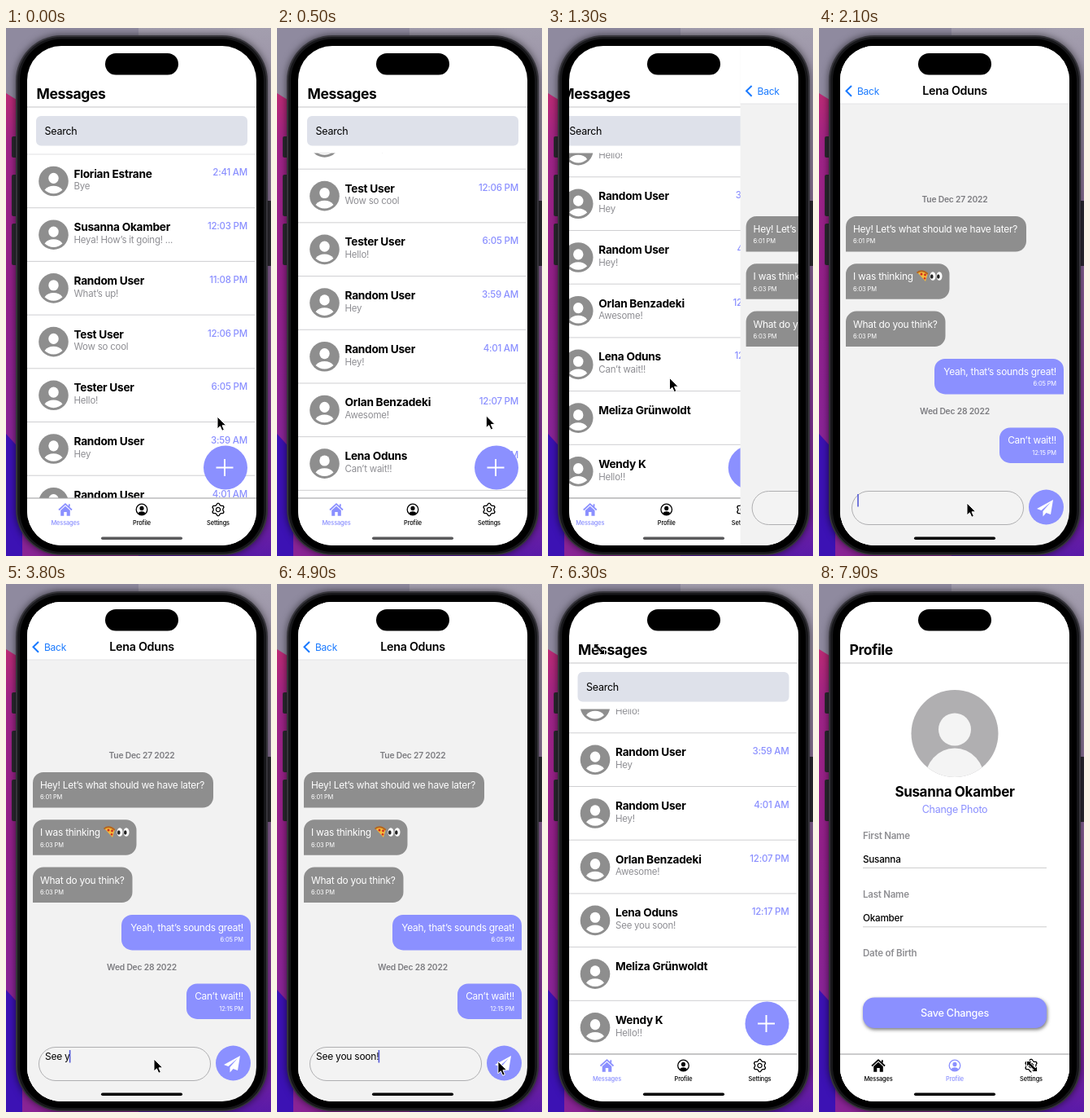
Write an HTML page that moves like this. It is 326 by 648 pixels and loops after 8000 ms.

```html
<!DOCTYPE html>
<html lang="en">
<head>
<meta charset="utf-8">
<title>Chat app demo</title>
<style>
  html, body { margin: 0; width: 100%; height: 100%; overflow: hidden; background: #000; }
  svg { display: block; width: 326px; height: 648px; }
  text { font-family: Inter, Roboto, sans-serif; letter-spacing: -.02em; white-space: pre; }
</style>
</head>
<body>
<svg id="stage" viewBox="0 0 326 648"></svg>
<script>
const LOOP = 8000, ACCENT = '#8b90ff', GRAY = '#8e8e8e', ROW = 65.7, SHIFT = 58.3;
const FRIEND = 'Lena Oduns', FIRST = 'Susanna', LAST = 'Okamber', DRAFT = 'See you soon!';
const TAP_CHAT = 1250, FOCUS = 2000, SEND = 5050, TAP_BACK = 5850, TAP_PROFILE = 7050, SLIDE = 550;

const text = (x, y, size, weight, fill, str, anchor = 'start', id = '') =>
  `<text id="${id}" x="${x}" y="${y}" font-size="${size}" font-weight="${weight}" fill="${fill}" text-anchor="${anchor}">${str}</text>`;
const rect = (x, y, w, h, fill, r = 0, more = '') =>
  `<rect x="${x}" y="${y}" width="${w}" height="${h}" rx="${r}" fill="${fill}" ${more}/>`;
const circle = (x, y, r, fill, more = '') => `<circle cx="${x}" cy="${y}" r="${r}" fill="${fill}" ${more}/>`;
const path = (d, fill, more = '') => `<path d="${d}" fill="${fill}" ${more}/>`;
const line = (x, y, w, color) => rect(x, y - .5, w, 1, color);

// Head and shoulders that fit a disc of radius 10
const person = c => `<ellipse cy="-2" rx="3.4" ry="3.6" fill="${c}"/>` +
  path('M0 8.4C-2.4 8.4-4.5 7.4-6 5.9-4.600 4-2.500 3.100 0 3.100S4.600 4 6 5.900C4.500 7.400 2.400 8.400 0 8.400Z', c);

// Contact list
const contacts = [
  ['Florian Estrane', 'Bye', '2:41 AM'], [`${FIRST} ${LAST}`, 'Heya! How’s it going! ...', '12:03 PM'],
  ['Random User', 'What’s up!', '11:08 PM'], ['Test User', 'Wow so cool', '12:06 PM'],
  ['Tester User', 'Hello!', '6:05 PM'], ['Random User', 'Hey', '3:59 AM'],
  ['Random User', 'Hey!', '4:01 AM'], ['Orlan Benzadeki', 'Awesome!', '12:07 PM'],
  [FRIEND, 'Can’t wait!!', '12:15 PM'], ['Meliza Grünwoldt', '', ''], ['Wendy K', 'Hello!!', '']
];
const avatar = (x, y) =>
  `<g transform="translate(${x} ${y}) scale(1.83)">${circle(0, 0, 10, GRAY)}${person('#fff')}</g>`;
const row = ([name, last, time], i) => {
  const y = 155 + i * ROW, id = name === FRIEND ? 'friend' : 'row' + i;
  return avatar(58.5, y + 33) + text(83.5, y + 28.5, 13.7, 700, '#000', name) +
    text(83.5, y + 43.3, 11.5, 400, '#8e8e93', last, 'start', id + 'Last') +
    text(297, y + 26.4, 11.5, 500, ACCENT, time, 'end', id + 'Time') + line(26, y + ROW, 280, '#cfcfd2');
};

// Tab bar
const gear = Array.from({ length: 24 }, (_, i) => {
  const a = (i + 1.5) * Math.PI / 12, r = i % 4 < 2 ? 7.6 : 5.9;
  return `${(r * Math.cos(a)).toFixed(2)} ${(r * Math.sin(a)).toFixed(2)}`;
}).join('L');
const outline = c => `stroke="${c}" stroke-width="1.3" stroke-linejoin="round"`;
const icons = [
  c => path('M-8 .5L0-6.800 8 .5M4.800-3.500V-6.800', 'none', `stroke="${c}" stroke-width="1.8"`) +
    path('M-5.800 1L0-4.300 5.800 1V7.800H1.700V3H-1.700V7.800H-5.800Z', c),
  c => circle(0, 0, 6.8, 'none', outline(c)) + `<g transform="scale(.76)">${person(c)}</g>`,
  c => path(`M${gear}Z`, 'none', outline(c)) + circle(0, 0, 2.6, 'none', outline(c))
];
const tabs = active => rect(26, 577, 282, 58, '#fff') + line(26, 577, 282, '#9a9a9c') +
  ['Messages', 'Profile', 'Settings'].map((label, i) => {
    const x = 73 + 94 * i, c = i === active ? ACCENT : '#000';
    return `<g transform="translate(${x} 591)">${icons[i](c)}</g>` + text(x, 610.3, 7.4, 450, c, label, 'middle');
  }).join('');
const heading = label => text(37.5, 87.3, 17.5, 700, '#000', label) + line(26, 97, 282, '#c4c4c6');

const listScreen = rect(26, 22, 282, 613, '#fff') +
  `<g clip-path="url(#listClip)"><g id="rows">${line(26, 155, 282, '#e2e2e4')}${contacts.map(row).join('')}</g></g>` +
  heading('Messages') + rect(37, 108, 260, 36.5, '#dee1ea', 6) + text(47.5, 130.8, 12.5, 400, '#000', 'Search') +
  circle(270, 539.5, 27, ACCENT) + path('M258.500 539.500h21M269 529v21', 'none', 'stroke="#fff" stroke-width="2"') + tabs(0);

// Conversation
const bubble = (y, w, str, time, mine) => {
  const x = mine ? 301 - w : 33, r = 13, h = 43.5, edge = mine ? 292 : 42, anchor = mine ? 'end' : 'start';
  const right = mine ? `v${h - r}h${r - w}` : `v${h - 2 * r}a${r} ${r} 0 0 1 ${-r} ${r}h${r - w}`;
  const left = mine ? `a${r} ${r} 0 0 1 ${-r} ${-r}v${2 * r - h}` : `v${r - h}`;
  return path(`M${x + r} ${y}h${w - 2 * r}a${r} ${r} 0 0 1 ${r} ${r}${right}${left}a${r} ${r} 0 0 1 ${r} ${-r}Z`, mine ? ACCENT : GRAY) +
    text(edge, y + 20, 11.9, 400, '#fff', str, anchor) + text(edge, y + 33.2, 7.5, 400, '#fff', time, anchor);
};
const day = (y, str) => text(167, y, 10.3, 600, '#7c7c80', str, 'middle');
const pizza = path('M121 300Q128 296 133.5 302L131 311Z', '#f5b93c') +
  path('M120.5 300.5Q127 295.5 133.8 302', 'none', 'stroke="#b5651d" stroke-width="2"') +
  circle(126, 302, 1.5, '#cf2f1f') + circle(130.5, 303, 1.4, '#cf2f1f') + circle(130, 307.3, 1.2, '#cf2f1f');
const eyes = [140, 148].map(x => `<ellipse cx="${x}" cy="304.5" rx="3.5" ry="5.3" fill="#fff"/>` +
  `<ellipse cx="${x - 1.2}" cy="305" rx="1.8" ry="2.8" fill="#222"/>`).join('');

const chatScreen = rect(26, 22, 282, 613, '#f2f2f2') + '<g id="thread">' +
  day(213.6, 'Tue Dec 27 2022') +
  bubble(231, 222, 'Hey! Let’s what should we have later?', '6:01 PM') +
  bubble(231 + SHIFT, 127.5, 'I was thinking', '6:03 PM') + pizza + eyes +
  bubble(231 + 2 * SHIFT, 122.5, 'What do you think?', '6:03 PM') +
  bubble(231 + 3 * SHIFT, 159, 'Yeah, that’s sounds great!', '6:05 PM', true) +
  day(473.6, 'Wed Dec 28 2022') + bubble(490.4, 79, 'Can’t wait!!', '12:15 PM', true) +
  `<g id="sent">${bubble(490.4 + SHIFT, 94, DRAFT, '12:17 PM', true)}</g></g>` +
  rect(26, 22, 282, 71, '#fff') + line(26, 93, 282, '#e6e6e8') +
  path('M40 71l-6.5 6.3 6.5 6.4', 'none', 'stroke="#1a7aff" stroke-width="2"') +
  text(47, 81.6, 12, 400, '#1a7aff', 'Back') + text(167, 81.6, 14.3, 600, '#000', FRIEND, 'middle') +
  rect(40.5, 568.5, 211, 41, '#f3f3f3', 20.5, 'stroke="#a8a8aa" stroke-width=".9"') +
  text(48, 584.3, 12, 400, '#000', '', 'start', 'draft') + rect(47.2, 572, 1.6, 15.5, '#555bd6', 0, 'id="caret"') +
  circle(279.5, 588, 21.5, ACCENT) + path('M288 579L268 590l5.5 2L285 582l-9.5 11v6.5l4-4.5 5.5 2Z', '#fff');

// Profile
const field = (y, label, value) => text(54, y, 11.5, 600, '#8e8e92', label) +
  (value ? text(54, y + 29, 11.7, 500, '#000', value) + line(54, y + 35.8, 226, '#ccc') : '');
const profileScreen = rect(26, 22, 282, 613, '#fff') + heading('Profile') +
  circle(167, 183.5, 53.5, '#b0afb1') + circle(167, 178.5, 20, '#f4f4f4') +
  '<ellipse cx="167" cy="241.5" rx="37" ry="40" fill="#f4f4f4" clip-path="url(#photoClip)"/>' +
  text(167, 260.6, 17, 700, '#000', `${FIRST} ${LAST}`, 'middle') + text(167, 280.6, 12.5, 400, ACCENT, 'Change Photo', 'middle') +
  field(312.6, 'First Name', FIRST) + field(385, 'Last Name', LAST) + field(457.4, 'Date of Birth') +
  rect(54, 507.5, 226, 37.5, ACCENT, 14, 'style="filter:drop-shadow(1.5px 2.5px 2px #0008)"') +
  text(167, 531, 12.7, 500, '#fff', 'Save Changes', 'middle') + tabs(1);

// Wallpaper and phone
const gradient = (id, stops) => `<linearGradient id="${id}" x2="0" y2="1">` +
  stops.map(([at, c]) => `<stop offset="${at}" stop-color="${c}"/>`).join('') + '</linearGradient>';
const wallpaper = rect(0, 0, 163, 648, 'url(#wallLeft)') + rect(163, 0, 163, 648, 'url(#wallRight)') +
  path('M0 0H163V180L0 80Z', '#8f8a9f') + path('M0 498L20 520V648H0Z', '#3c12b4');
const buttons = [[7, 133, 26], [7, 180, 51], [7, 240, 51], [320, 212, 80]]
  .map(([x, y, h]) => rect(x, y, 7, h, '#2b2930', 2)).join('');
const body = rect(12, 9, 310, 638, '#35343a', 56, 'style="filter:drop-shadow(0 0 5px #0009)"') +
  rect(14, 11, 306, 634.5, '#17171a', 54) + rect(17, 13.5, 300, 629.5, '#000', 51);

stage.innerHTML = `<defs>
  <clipPath id="screenClip">${rect(26, 22, 282, 613, '#000', 42)}</clipPath>
  <clipPath id="listClip">${rect(26, 153.5, 282, 424, '#000')}</clipPath>
  <clipPath id="photoClip">${circle(167, 183.5, 53.5, '#000')}</clipPath>
  ${gradient('wallLeft', [[.1, '#c22c70'], [.22, '#a02487'], [.5, '#92208a'], [.76, '#8a2496']])}
  ${gradient('wallRight', [[0, '#a39eae'], [.2, '#94889f'], [.45, '#8a6598'], [.7, '#8a3d9c'], [.88, '#80259e'], [1, '#5a1aa8']])}
  </defs>` + wallpaper + buttons + body +
  `<g clip-path="url(#screenClip)"><g id="list">${listScreen}</g><g id="chat">${chatScreen}</g><g id="profile">${profileScreen}</g></g>` +
  rect(122, 31, 90, 26.5, '#000', 13.2) + rect(117, 624.5, 100, 3.5, '#000', 1.75, 'id="homeBar"') +
  '<g id="pointer"><g id="arrow">' +
  path('M0 0V15L3.4 11.8 5.8 17.3 8.4 16.2 6 10.8H10.8Z', '#000', 'stroke="#fff"') + '</g><g id="resize">' +
  path('M-6.5-6.5H.5L-1.8-4.2 4.2 1.8 6.5-.5V6.5H-.5L1.8 4.2-4.2-1.8-6.5.5Z', '#000', 'stroke="#fff"') + '</g></g>';

const $ = id => document.getElementById(id);
const clamp = v => Math.min(1, Math.max(0, v));
const smooth = v => v * v * (3 - 2 * v);
const move = (id, x, y) => $(id).setAttribute('transform', `translate(${x} ${y})`);
const show = (id, on) => $(id).setAttribute('visibility', on ? 'visible' : 'hidden');
const slide = (t, start) => 1 - (1 - clamp((t - start) / SLIDE)) ** 3;

const track = [[0, 260, 477], [450, 260, 477], [1000, 149, 427], [1250, 149, 427], [1950, 182, 583],
  [4500, 182, 583], [4950, 275, 586], [5150, 275, 586], [5650, 50, 58], [5720, 50, 58], [5850, 50, 76], [6300, 63, 80],
  [6450, 63, 80], [6950, 167, 592], [7150, 167, 592], [7700, 262, 592], [LOOP, 262, 592]];
function pointerAt(t) {
  const i = track.findIndex(k => k[0] > t), [t0, x0, y0] = track[i - 1], [t1, x1, y1] = track[i];
  const p = smooth((t - t0) / (t1 - t0));
  return [x0 + (x1 - x0) * p, y0 + (y1 - y0) * p];
}

function draw(t) {
  const open = slide(t, TAP_CHAT) - slide(t, TAP_BACK), sent = t >= SEND;
  move('rows', 0, -300.7 * smooth(clamp((t - 50) / 800)));
  move('list', -84 * open, 0);
  move('chat', 282 * (1 - open), 0);
  show('profile', t >= TAP_PROFILE);

  move('thread', 0, sent ? -SHIFT : 0);
  show('sent', sent);
  $('friendLast').textContent = sent ? DRAFT : 'Can’t wait!!';
  $('friendTime').textContent = sent ? '12:17 PM' : '12:15 PM';

  const typed = sent ? 0 : Math.max(0, Math.floor(5 + (t - 3750) / 115));
  $('draft').textContent = DRAFT.slice(0, typed).replace(/ /g, '\u00a0');
  move('caret', typed ? $('draft').getComputedTextLength() : 0, 0);
  show('caret', t >= FOCUS && t < TAP_PROFILE && (typed > 0 || (t - (sent ? 5150 : FOCUS)) % 1000 < 600));

  $('homeBar').setAttribute('fill', t < 1400 ? '#5a5a5c' : '#000');
  move('pointer', ...pointerAt(t));
  show('arrow', t < 5600);
  show('resize', t >= 5600);
}

function tick() {
  draw(performance.now() % LOOP);
  requestAnimationFrame(tick);
}
tick();
</script>
</body>
</html>
```
